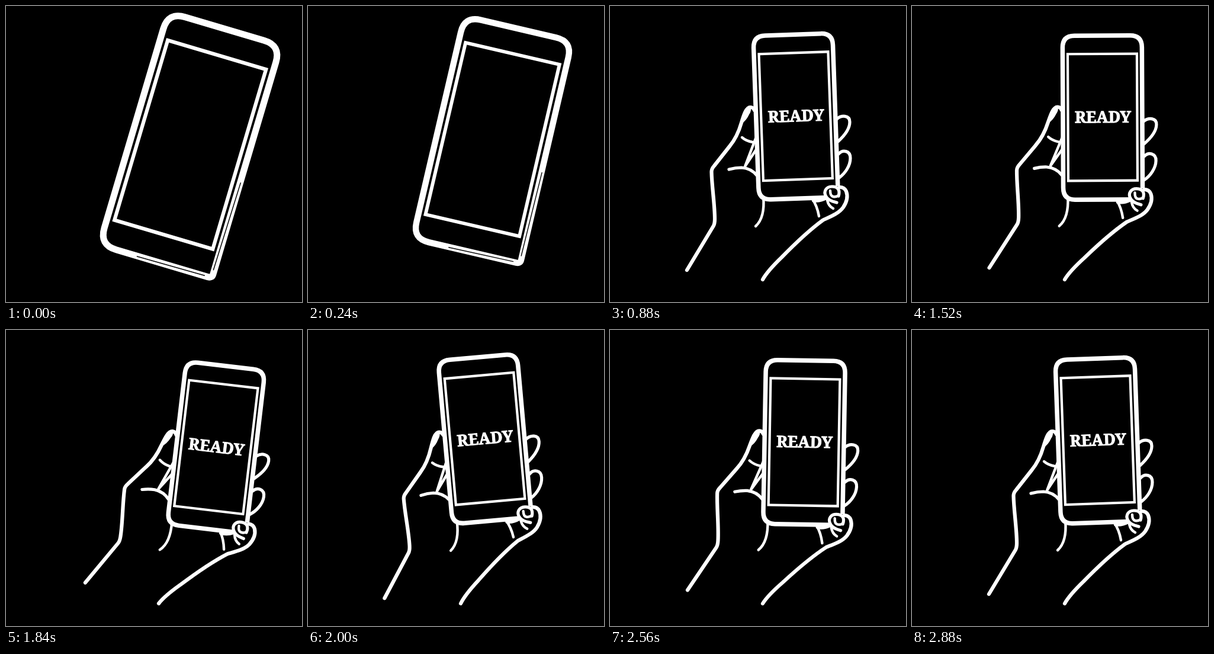
An HTML page that plays this animation: 500x500 px, repeating every 3540 ms.

```html
<!DOCTYPE html>
<html lang="en">
<head>
<meta charset="utf-8">
<title>Ready</title>
<style>
  html, body { margin: 0; width: 100%; height: 100%; overflow: hidden; background: #000; }
  svg { display: block; width: 100%; height: 100%; }
  path, rect { fill: none; stroke: #fff; stroke-linecap: round; stroke-linejoin: round; }
  .hand path { stroke-width: 6.2; stroke-dasharray: 1 2; }
  .hand .medium { stroke-width: 5.2; }
  .hand .thin { stroke-width: 4.4; }
  .hand .mask { fill: #000; stroke: none; }
  .hand .nail { fill: #fff; stroke-width: 3; }
  .body { fill: #000; stroke-width: 7.5; }
  .screen { stroke-width: 4.2; stroke-linejoin: miter; }
  .seam { stroke: #000; stroke-width: 1; }
  text { font: bold 26.8px "Noto Serif", serif; fill: #fff; stroke: #fff; stroke-width: 1; text-anchor: middle; }
</style>
</head>
<body>
<svg viewBox="0 0 500 500">
  <g id="scene">
    <g class="hand">
      <!-- forearm and thumb -->
      <path pathLength="1" d="M130 446 L174.500 372 Q177 368 177 360 C177 335 172 305 171.500 280 Q171.500 275 176 270 L202 237 C212 225 218 211 222 197 C226 184 230 171 237 171 Q242 171 244 176"/>
      <path pathLength="1" class="nail" d="M222 197 Q227 174 236 171 Q238 176 234 182 Q229 193 222 197Z"/>
      <!-- palm creases -->
      <path pathLength="1" class="thin" d="M223 222 Q230 228 241 230"/>
      <path pathLength="1" class="thin" d="M247 221 L228 271 L248 241"/>
      <path pathLength="1" class="medium" d="M201 276 Q212 273 222 273 Q238 274 248 286"/>
      <path pathLength="1" class="thin" d="M259 322 C261 345 257 362 246 372"/>
      <!-- fingers behind the phone -->
      <path pathLength="1" class="medium" d="M383 191 C391 184 405 184 405 196 C405 208 395 220 385 229"/>
      <path pathLength="1" class="medium" d="M386 250 C393 242 406 244 406 257 C406 270 397 283 387 290"/>
    </g>

    <g id="phone">
      <path class="body" d="M-47 -138.500 H47 Q67 -138.500 67 -118.500 V134 Q67 138.500 62 138.500 H-47 Q-67 138.500 -67 118.500 V-118.500 Q-67 -138.500 -47 -138.500Z"/>
      <g id="seams">
        <path class="seam" d="M67.500 25 L66 129"/>
        <path class="seam" d="M-22 139 L58 138"/>
      </g>
      <rect class="screen" x="-58.500" y="-107.500" width="117" height="214"/>
      <text id="label" x="0.500" y="8.500">READY</text>
    </g>

    <g class="hand">
      <!-- little finger in front of the phone -->
      <path class="mask" d="M364 318 Q363 304 375 304 L396 305 Q405 318 397 340 L385 348 L366 331Z"/>
      <path pathLength="1" d="M258 462 C264 451 276 438 290 424.500 C311 403 336 379 360 361.500 C374 355 387 350 394 340 C400 331 402 321 399 313 Q396 306 388 306"/>
      <path pathLength="1" class="medium" d="M386 321 C389 311 385 305 375 305 C365 305 361 313 364 320 Q367 327 376 330 L383 332"/>
      <path pathLength="1" class="thin" d="M372 312 Q372 321 377 322 Q382 323 386 320"/>
      <path pathLength="1" class="thin" d="M342 326 Q350 338 353 355"/>
      <path pathLength="1" class="thin" d="M343 329 Q354 331 365 325"/>
      <path pathLength="1" class="thin" d="M367 328 Q369 338 377 342"/>
    </g>
  </g>
</svg>
<script>
  const LOOP = 3540, STEP = 80;
  const INTRO_END = 880, HAND_START = 560, HAND_END = 880, LABEL_START = 720;
  const SWING = [[1440, 0], [1760, 11], [2160, -10.8], [2560, 3], [2880, 0]];

  const byId = id => document.getElementById(id);
  const scene = byId('scene'), phone = byId('phone'), seams = byId('seams'), label = byId('label');
  const hands = document.querySelectorAll('.hand');
  const strokes = document.querySelectorAll('.hand path[pathLength]');

  const progress = (t, from, to) => Math.min(1, Math.max(0, (t - from) / (to - from)));
  const ease = u => u * u * (3 - 2 * u);
  const mix = (a, b, u) => a + (b - a) * u;
  const show = (el, on) => { el.style.visibility = on ? 'visible' : 'hidden'; };

  function swingAngle(t) {
    let angle = 0;
    for (let i = 1; i < SWING.length; i++) {
      const [from, a] = SWING[i - 1], [to, b] = SWING[i];
      if (t >= from) angle = mix(a, b, ease(progress(t, from, to)));
    }
    return angle;
  }

  function draw(time) {
    const t = Math.floor((time % LOOP) / STEP) * STEP;
    const u = ease(progress(t, 0, INTRO_END));
    const x = mix(311, 313.7, u), y = mix(235, 186.7, u);
    phone.setAttribute('transform',
      `translate(${x} ${y}) rotate(${mix(16.5, -2, u)}) scale(${mix(1.48, 1, u)})`);
    scene.setAttribute('transform', `rotate(${swingAngle(t)} 258 462)`);

    const drawn = ease(progress(t, HAND_START, HAND_END));
    hands.forEach(hand => show(hand, drawn > 0));
    strokes.forEach(path => { path.style.strokeDashoffset = 1 - drawn; });
    show(seams, t < HAND_END);
    show(label, t >= LABEL_START);
  }

  const start = performance.now();
  function tick() {
    draw(performance.now() - start);
    requestAnimationFrame(tick);
  }
  tick();
</script>
</body>
</html>
```
